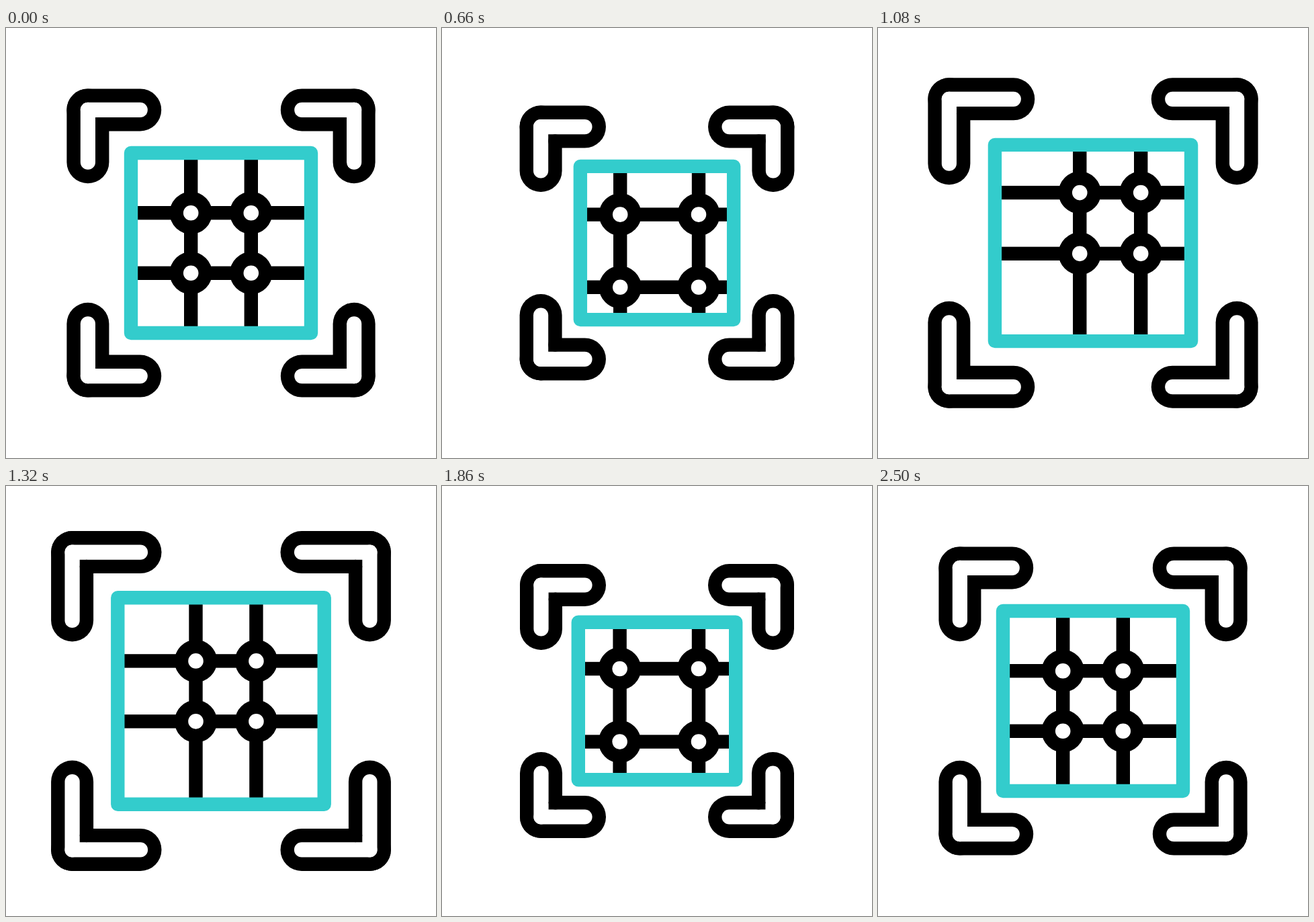
Animation, 640 px wide and 640 px high, one loop 2720 ms. Source, as an HTML page without scripts:

```html
<!DOCTYPE html>
<html lang="en">
<head>
<meta charset="utf-8">
<title>Grid focus</title>
<style>
  /* edge, tip: outer bounds of a corner bracket; box: outer edge of the square;
     v1, v2, h1, h2: centres of the grid lines */
  @property --edge { syntax: "<length>"; inherits: true; initial-value: 90.4px; }
  @property --tip { syntax: "<length>"; inherits: true; initial-value: 231.2px; }
  @property --box { syntax: "<length>"; inherits: true; initial-value: 175.8px; }
  @property --v1 { syntax: "<length>"; inherits: true; initial-value: 275.2px; }
  @property --v2 { syntax: "<length>"; inherits: true; initial-value: 364.8px; }
  @property --h1 { syntax: "<length>"; inherits: true; initial-value: 275.2px; }
  @property --h2 { syntax: "<length>"; inherits: true; initial-value: 364.8px; }

  html, body { margin: 0; height: 100%; overflow: hidden; background: #fff; }

  svg {
    display: block;
    width: 100%;
    height: 100%;
    animation: 2720ms cubic-bezier(.333, 0, .667, 1) infinite;
    animation-name: brackets, square, grid;
  }

  @keyframes brackets {
    0%, 7.35%, 91.91%, 100% { --edge: 90.4px; --tip: 231.2px; }
    25% { --edge: 115.7px; --tip: 244px; }
    44.12% { --edge: 68px; --tip: 231.6px; }
    56.62% { --edge: 64.9px; --tip: 231.2px; }
    68.38% { --edge: 116px; --tip: 244px; }
    77.94% { --edge: 78px; --tip: 231.2px; }
  }

  @keyframes square {
    0%, 7.35%, 91.91%, 100% { --box: 175.8px; }
    25.74% { --box: 196px; }
    44.85% { --box: 156.8px; }
    56.62% { --box: 153.8px; }
    68.38% { --box: 192.6px; }
    77.94% { --box: 166.6px; }
  }

  @keyframes grid {
    0%, 7.35%, 91.91%, 100% { --v1: 275.2px; --v2: 364.8px; --h1: 275.2px; --h2: 364.8px; }
    24.26% { --v1: 265.2px; --v2: 382px; --h1: 277.6px; --h2: 385.8px; }
    41.18% { --v1: 301px; --v2: 391.4px; --h1: 244.4px; --h2: 334.8px; }
    57.35% { --v1: 258.5px; --v2: 347.8px; --h1: 281.2px; --h2: 370.5px; }
    68.38% { --v1: 264.6px; --v2: 382px; --h1: 272px; --h2: 380.6px; }
    77.94% { --v1: 279.8px; --v2: 364px; --h1: 279.2px; --h2: 359.4px; }
  }

  .arm {
    --long: calc(var(--tip) - var(--edge));
    x: var(--edge);
    y: var(--edge);
    width: 63px;
    height: var(--long);
    rx: 31.5px;
  }
  .arm.across { width: var(--long); height: 63px; }

  .hollow {
    --start: calc(var(--edge) + 20.4px);
    --long: calc(var(--tip) - var(--edge) - 40.8px);
    x: var(--start);
    y: var(--start);
    width: 22.2px;
    height: var(--long);
    rx: 11.1px;
    fill: #fff;
  }
  .hollow.across { width: var(--long); height: 22.2px; }

  .elbow {
    cx: calc(var(--edge) + 52.8px);
    cy: calc(var(--edge) + 52.8px);
    r: 10.2px;
  }

  .line, .frame {
    --start: calc(var(--box) + 10.2px);
    --size: calc(640px - 2 * var(--start));
  }
  .line.down { x: calc(var(--x) - 10.2px); y: var(--start); width: 20.4px; height: var(--size); }
  .line.over { x: var(--start); y: calc(var(--y) - 10.2px); width: var(--size); height: 20.4px; }

  .frame {
    x: var(--start);
    y: var(--start);
    width: var(--size);
    height: var(--size);
    fill: none;
    stroke: #3cc;
    stroke-width: 20.4px;
    stroke-linejoin: round;
  }

  .node {
    cx: var(--x);
    cy: var(--y);
    r: 21.4px;
    fill: #fff;
    stroke: #000;
    stroke-width: 20.2px;
  }

  .left { --x: var(--v1); }
  .right { --x: var(--v2); }
  .top { --y: var(--h1); }
  .bottom { --y: var(--h2); }
</style>
</head>
<body>
<svg viewBox="0 0 640 640">
  <g id="bracket">
    <rect class="arm"/>
    <rect class="arm across"/>
    <rect class="hollow"/>
    <rect class="hollow across"/>
    <circle class="elbow"/>
  </g>
  <use href="#bracket" transform="matrix(-1 0 0 1 640 0)"/>
  <use href="#bracket" transform="matrix(1 0 0 -1 0 640)"/>
  <use href="#bracket" transform="matrix(-1 0 0 -1 640 640)"/>

  <rect class="line down left"/>
  <rect class="line down right"/>
  <rect class="line over top"/>
  <rect class="line over bottom"/>
  <circle class="node left top"/>
  <circle class="node right top"/>
  <circle class="node left bottom"/>
  <circle class="node right bottom"/>
  <rect class="frame"/>
</svg>
</body>
</html>
```
